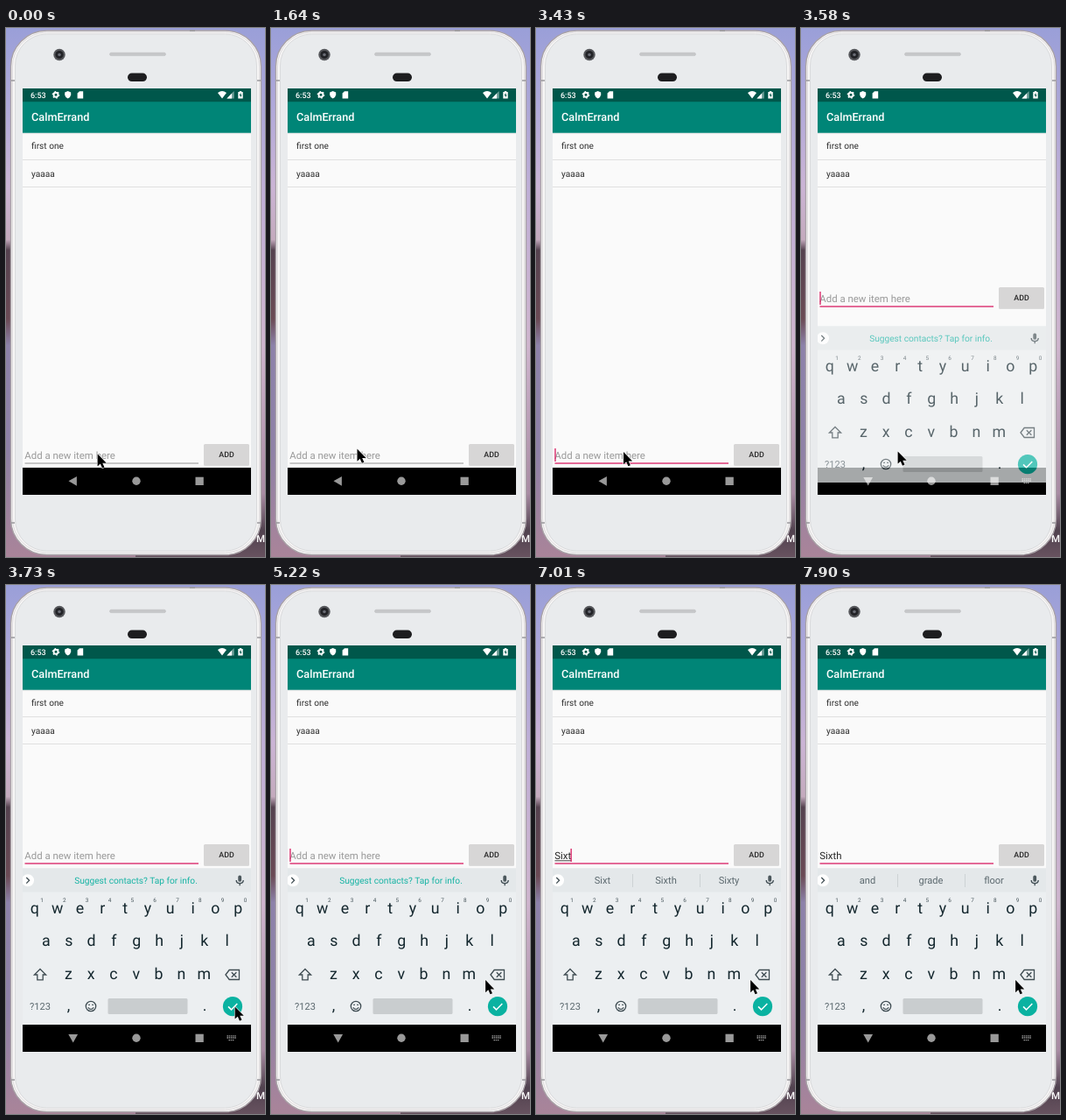
Animation of 296x604 px, one loop 8 s. Source, as an HTML page:

```html
<!DOCTYPE html>
<html lang="en">
<head>
<meta charset="utf-8">
<title>Task list on a phone</title>
<style>
  html, body { margin: 0; width: 100%; height: 100%; overflow: hidden; }
  svg { display: block; width: 296px; height: 604px; }
  text { font-family: Roboto, sans-serif; white-space: pre; text-rendering: geometricPrecision; }
  .mid { text-anchor: middle; }
  .bold { font-weight: 500; }
  .key { font-size: 17.8px; fill: #14272e; }
  .num { font-size: 6.4px; fill: #46545a; }
  .word { font-size: 11.1px; fill: #5b686e; }
  .line { fill: none; stroke: #3f4c52; stroke-width: 1.3; }
</style>
</head>
<body>
<svg viewBox="0 0 296 604">
  <defs>
    <linearGradient id="skyLeft" x2="0" y2="1">
      <stop offset="0" stop-color="#9a9fd8"/>
      <stop offset=".15" stop-color="#b1a9da"/>
      <stop offset=".3" stop-color="#cbb4d5"/>
      <stop offset=".4" stop-color="#c4aabd"/>
      <stop offset=".42" stop-color="#55424f"/>
      <stop offset=".55" stop-color="#6b4a55"/>
      <stop offset=".6" stop-color="#8d82aa"/>
      <stop offset=".8" stop-color="#8f81a7"/>
      <stop offset="1" stop-color="#a98499"/>
    </linearGradient>
    <linearGradient id="skyRight" x2="0" y2="1">
      <stop offset="0" stop-color="#9a9fd8"/>
      <stop offset=".3" stop-color="#bfafd7"/>
      <stop offset=".6" stop-color="#cfb5ce"/>
      <stop offset=".88" stop-color="#a88ba3"/>
      <stop offset=".95" stop-color="#51424f"/>
      <stop offset="1" stop-color="#67525f"/>
    </linearGradient>
    <linearGradient id="drop" x2="0" y2="1">
      <stop offset="0" stop-opacity=".1"/>
      <stop offset="1" stop-opacity="0"/>
    </linearGradient>
    <clipPath id="screen"><path d="M19 69h261v464H19z"/></clipPath>
  </defs>

  <!-- wallpaper -->
  <path d="M0 0h148v604H0z" fill="url(#skyLeft)"/>
  <path d="M148 0h148v604H148z" fill="url(#skyRight)"/>
  <text x="286" y="587" class="bold" font-size="11.5" fill="#fff">M</text>

  <!-- phone -->
  <rect x="5.5" y="3" width="286" height="598.5" rx="41" fill="#f7f6f6" stroke="#a9a2a7" stroke-width="1.4"/>
  <rect x="7.5" y="5" width="282" height="594" rx="39" fill="none" stroke="#dddadc"/>
  <rect x="10.5" y="7" width="276" height="590" rx="36" fill="#e9ebed" stroke="#d9dadc"/>
  <path d="M6 60h4M287 60h4M6 565h4M287 565h4M210 3h6" stroke="#9b999d" stroke-width="1.4"/>
  <circle cx="61" cy="30.5" r="6.7" fill="#55565a"/>
  <circle cx="61" cy="30.5" r="4.6" fill="#222327"/>
  <circle cx="61" cy="30.5" r="1.8" fill="#696b74"/>
  <rect x="118.5" y="28.2" width="64" height="3.4" rx="1.7" fill="#c6c7c9" stroke="#b6b7b9" stroke-width=".5"/>
  <rect x="139" y="51.5" width="22" height="9.6" rx="4.8" fill="#1d1d1f"/>

  <g clip-path="url(#screen)">
    <path d="M19 69h261v464H19z" fill="#fafafa"/>
    <path d="M19 119.8h261v2H19z" fill="url(#drop)"/>
    <path d="M19 84h261v35.8H19z" fill="#008577"/>
    <path d="M19 69h261v15.2H19z" fill="#00574b"/>
    <g fill="#fff">
      <text x="28" y="79.6" class="bold" font-size="9">6:53</text>
      <circle cx="57" cy="76.3" r="2.5" fill="none" stroke="#fff" stroke-width="1.9"/>
      <circle cx="57" cy="76.3" r="3.7" fill="none" stroke="#fff" stroke-width="1.3" stroke-dasharray="1.5 2.37"/>
      <path d="M70.7 72l3.5 1.5v2.8q-.4 3-3.5 4.300-3.100-1.300-3.500-4.300v-2.800z"/>
      <path d="M84 72.200h4.200v8.200h-6.600v-5.800z"/>
      <path d="M242 74q5-4 10 0l-5 6.400z"/>
      <path d="M260.600 72v8.400h-8.200z" opacity=".45"/>
      <path d="M258 74.700v5.700h-5.600z"/>
      <path d="M266.800 72h2.400v1h1.500v7.500h-5.400V73h1.500z"/>
      <path d="M268.400 73.800l-1.800 3.400h1.300v2.300l1.700-3.300h-1.200z" fill="#00574b"/>
      <text x="29" y="106.400" class="bold" font-size="12.700">CalmErrand</text>
    </g>
    <path d="M19 150.500h261M19 181.500h261" stroke="#e0e0e0"/>
    <g font-size="10.160" fill="#303030">
      <text x="29" y="138.400">first one</text>
      <text x="29" y="169.600">yaaaa</text>
    </g>

    <!-- input row -->
    <g id="row">
      <path id="rule" d="M21.500 497h198.500"/>
      <text id="hint" x="21.300" y="492" font-size="11.430" fill="#999">Add a new item here</text>
      <text id="typed" x="21.200" y="492" font-size="11.430" fill="#262626"></text>
      <path id="compose" stroke="#333" stroke-width=".9"/>
      <path id="caret" d="M0 480v15" stroke="#d81b60" stroke-width="1.300"/>
      <rect x="226" y="476" width="52" height="24" rx="1.500" opacity=".12"/>
      <rect x="226" y="475" width="52" height="24" rx="1.500" fill="#d7d6d6"/>
      <text x="252" y="490.300" class="mid bold" font-size="8.900" fill="#262626">ADD</text>
    </g>

    <path d="M19 502h261v31H19z"/>

    <!-- keyboard -->
    <g id="board">
      <path d="M19 323.400h261V502H19z" fill="#eceff1"/>
      <path d="M19 323.400h261v27H19z" fill="#e4e8ea"/>
      <path d="M19 502h261v31H19z"/>
      <circle cx="25" cy="337.300" r="7" fill="#fff"/>
      <path d="M23.300 334l3.300 3.300-3.300 3.300" class="line"/>
      <rect x="265.300" y="331.500" width="3.800" height="7.300" rx="1.900" fill="#4c585d"/>
      <path d="M263.200 337q0 3.700 4 3.700t4-3.700M267.200 340.700v2.500" class="line"/>
      <text id="offer" x="148.500" y="341" class="mid" font-size="10.160" fill="#16b3a4">Suggest contacts? Tap for info.</text>
      <g id="words">
        <path d="M110.500 330v15M187.500 330v15" stroke="#cdd2d4"/>
      </g>
      <g id="keys"></g>
      <path d="M39 438.500l6.600 6.500h-3.400v5.800h-6.400V445h-3.400z" class="line"/>
      <path d="M251 445l4.200-5.500h11.300v11H255.200zM257.800 442.200l5.600 5.600m0-5.600l-5.600 5.600" class="line"/>
      <circle cx="97" cy="481" r="5.700" class="line"/>
      <path d="M93.800 482.300q3.200 4.200 6.400 0M94.200 479.300h1.700M98.200 479.300h1.700" class="line"/>
      <rect x="116.500" y="472" width="91" height="18" rx="1.500" fill="#c9cdcf"/>
      <circle cx="259" cy="481.200" r="11.100" fill="#0ab2a1"/>
      <path d="M254 481.400l3.500 3.500 6.800-7" fill="none" stroke="#fff" stroke-width="1.500"/>
    </g>

    <!-- navigation -->
    <g fill="#fff" opacity=".6">
      <path id="back" d="M71.500 517.300l9.400-5.400v10.800z"/>
      <circle cx="149" cy="517.300" r="4.700"/>
      <path d="M216.500 512.700h9.300v9.300h-9.300z"/>
      <path id="switcher" d="M252.500 514.800h10.500M252.500 517h10.500M254.500 519.600h6.500" stroke="#fff" stroke-width="1.300" stroke-dasharray="1.500 .7"/>
    </g>
  </g>

  <path id="pointer" d="M0 0V14.200L3.200 11.300 5.400 16.300 7.900 15.200 5.700 10.400H10.200Z" stroke="#fff" stroke-width="1.100" stroke-linejoin="round" paint-order="stroke"/>
</svg>

<script>
const LOOP = 8000;
const el = id => document.getElementById(id);
const show = (node, on) => node.setAttribute('visibility', on ? 'inherit' : 'hidden');

function label(parent, text, x, y, cls) {
  const node = document.createElementNS('http://www.w3.org/2000/svg', 'text');
  node.setAttribute('x', x);
  node.setAttribute('y', y);
  node.setAttribute('class', 'mid ' + cls);
  node.textContent = text;
  parent.append(node);
  return node;
}

const PITCH = 25.83;
[['qwertyuiop', 32.8, 375.2], ['asdfghjkl', 45.9, 412.4], ['zxcvbnm', 71.3, 449.8]].forEach(([row, x, y]) =>
  [...row].forEach((ch, i) => label(el('keys'), ch, x + i * PITCH, y, 'key')));
[...'1234567890'].forEach((ch, i) => label(el('keys'), ch, 41 + i * PITCH, 362.3, 'num'));
label(el('keys'), '?123', 39, 484.8, 'word');
label(el('keys'), ',', 71.5, 485.5, 'key');
label(el('keys'), '.', 227, 485.5, 'key');
const words = [76, 148.5, 220.5].map(x => label(el('words'), '', x, 341.2, 'word'));

// Each table holds [start, value...]; a value lasts until the next start.
const pointer = [
  [0, 104.6, 486.3], [1200, 102, 482], [1340, 99.5, 479],
  [1640, 98.5, 480.5], [1790, 97.5, 483], [1940, 96.5, 485.3],
  [2390, 95.7, 485.5], [2540, 96, 485], [2680, 96.8, 484.3],
  [3430, 100, 484], [3580, 110.6, 483.4], [3730, 261.6, 481.4], [3880, 275.5, 489],
  [4180, 269, 480], [4330, 257, 463], [4480, 248, 454], [4630, 245.1, 451]
];
const caret = [
  [0, 0], [3130, 1], [3730, 0], [4180, 1], [4630, 0],
  [5220, 1], [5670, 0], [5970, 1], [7900, 0]
];
const typed = [[0, ''], [5970, 'S'], [6420, 'Si'], [6720, 'Six'], [7010, 'Sixt'], [7160, 'Sixth'], [7460, 'Sixth ']];
const offers = [[0, ''], [7010, 'Sixt', 'Sixth', 'Sixty'], [7460, 'and', 'grade', 'floor']];
const board = [[0, 0, 40], [3580, 0.7, 17], [3730, 1, 0]]; // opacity, drop

const at = (table, t) => table.findLast(step => step[0] <= t).slice(1);

function draw(t) {
  const [x, y] = at(pointer, t);
  el('pointer').setAttribute('transform', `translate(${x} ${y})`);

  const focused = t >= 3130;
  const [opacity, drop] = at(board, t);
  const open = opacity > 0;
  el('row').setAttribute('transform', `translate(0 ${open ? -179 : 0})`);
  el('rule').setAttribute('stroke', focused ? '#dc3a76' : '#929292');
  el('rule').setAttribute('stroke-width', focused ? 1.5 : 1);
  el('board').setAttribute('opacity', opacity);
  el('board').setAttribute('transform', `translate(0 ${drop})`);
  el('back').setAttribute('transform', open ? 'rotate(-90 76.7 517.3)' : '');
  show(el('switcher'), open);

  const [text] = at(typed, t);
  el('typed').textContent = text;
  const end = text ? 21.2 + el('typed').getComputedTextLength() : 22;
  show(el('hint'), !text);
  show(el('compose'), text && t < 7460);
  el('compose').setAttribute('d', `M21.5 493.8H${end}`);
  show(el('caret'), at(caret, t)[0]);
  el('caret').setAttribute('transform', `translate(${end} 0)`);

  const picks = at(offers, t);
  show(el('offer'), !picks[0]);
  show(el('words'), picks[0]);
  words.forEach((word, i) => { word.textContent = picks[i] || ''; });
}

const start = performance.now();
function tick() {
  draw((performance.now() - start) % LOOP);
  requestAnimationFrame(tick);
}
tick();
</script>
</body>
</html>
```
